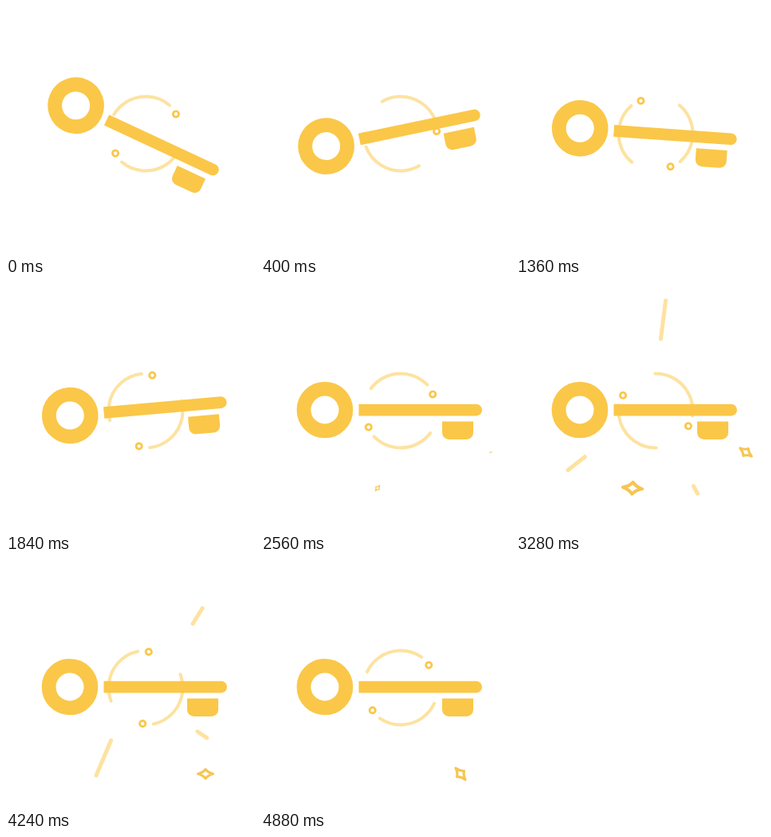
These frames come from a looping animation (312x312 px, 4.96 s). An HTML page:

```html
<!DOCTYPE html>
<html lang="en">
<head>
<meta charset="utf-8">
<title>Swinging key</title>
<style>
  html, body { margin: 0; height: 100%; overflow: hidden; background: #fff; }
  svg { display: block; width: 100%; height: 100%; }
  .line { fill: none; stroke-linecap: round; stroke-linejoin: round; }
</style>
</head>
<body>
<svg viewBox="0 0 312 312">
  <g id="orbit" class="line">
    <circle r="46.5" pathLength="360" stroke="#fde2a0" stroke-width="4" stroke-dasharray="99 81" stroke-dashoffset="116"/>
    <g stroke="#fac748" stroke-width="2.8">
      <circle cx="45.2" r="3.6"/>
      <circle cx="-45.2" r="3.6"/>
    </g>
  </g>
  <g id="key" fill="#fac748">
    <circle cx="80" cy="159" r="26.4" fill="none" stroke="#fac748" stroke-width="17.8"/>
    <path d="M122.5 151.8H269.7a7.3 7.3 0 0 1 0 14.6H122.5z"/>
    <path d="M227 173.5H266V187.500a8.500 8.500 0 0 1 -8.500 8.500H235.500a8.500 8.500 0 0 1 -8.500 -8.500z"/>
  </g>
  <g id="rays" class="line" stroke="#fde2a0" stroke-width="5"></g>
  <g id="stars" class="line" stroke="#f6c552" stroke-width="3"></g>
</svg>
<script>
const LOOP = 4960;
const SWING = 367;
const swings = [25, -12.3, 10.8, -10, 7.5, -5, 0];
const GROW = 360;

// inner point, outer point, start, delay until the tail follows
const rays = [
  { from: [93.5, 212], to: [65, 234.5], start: 2620, hold: 540 },
  { from: [181, 73.5], to: [187.5, 22], start: 2680, hold: 540 },
  { from: [222.5, 254.5], to: [244.5, 296.500], start: 3168, hold: 460 },
  { from: [230, 86.5], to: [246, 60.5], start: 3580, hold: 540 },
  { from: [133, 222.8], to: [113, 270], start: 3640, hold: 540 },
  { from: [240, 215], to: [287.500, 247], start: 4122, hold: 380 }
];

// angle is the tilt reached at time ref
const stars = [
  { x: 146, y: 257, size: 1.35, start: 2400, end: 4000, angle: 5, ref: 3280 },
  { x: 288, y: 212, size: 1, start: 2450, end: 4150, angle: 35, ref: 3280 },
  { x: 250, y: 268, size: 1.05, start: 3850, end: 5400, angle: 0, ref: 4240 }
];

const $ = id => document.getElementById(id);
const clamp = v => Math.min(1, Math.max(0, v));
const ease = v => (1 - Math.cos(Math.PI * clamp(v))) / 2;
const mix = (a, b, k) => a + (b - a) * k;

function addPath(parent) {
  const path = document.createElementNS("http://www.w3.org/2000/svg", "path");
  return $(parent).appendChild(path);
}

for (const ray of rays) ray.el = addPath("rays");
for (const star of stars) {
  star.el = addPath("stars");
  star.el.setAttribute("d", "M-9 0Q-3 -1.500 0 -5.500Q3 -1.500 9 0Q3 1.500 0 5.500Q-3 1.500 -9 0z");
}

function keyAngle(t) {
  const i = Math.floor(t / SWING);
  if (i >= swings.length - 1) return 0;
  return mix(swings[i], swings[i + 1], ease(t / SWING - i));
}

function drawRay({ el, from, to, start, hold }, t) {
  const tip = ease((t - start) / GROW);
  const tail = ease((t - start - hold) / GROW);
  const at = k => from.map((v, i) => mix(v, to[i], k).toFixed(2)).join(" ");
  el.setAttribute("d", tip - tail > 0.01 ? `M${at(tail)}L${at(tip)}` : "");
}

function drawStar({ el, x, y, size, start, end, angle, ref }, t) {
  const scale = size * Math.min(ease((t - start) / 400), ease((end - t) / 400));
  const turn = angle + (t - ref) * 0.078;
  el.style.display = scale > 0.01 ? "" : "none";
  el.setAttribute("transform", `translate(${x} ${y}) rotate(${turn}) scale(${scale})`);
}

function draw(now) {
  const t = now % LOOP;
  $("orbit").setAttribute("transform", `translate(175 160) rotate(${-33 + 360 * t / LOOP})`);
  $("key").setAttribute("transform", `rotate(${keyAngle(t)} 161 159)`);
  for (const ray of rays) drawRay(ray, t);
  for (const star of stars) drawStar(star, t);
}

const begin = performance.now();
function tick() {
  draw(performance.now() - begin);
  requestAnimationFrame(tick);
}
tick();
</script>
</body>
</html>
```
